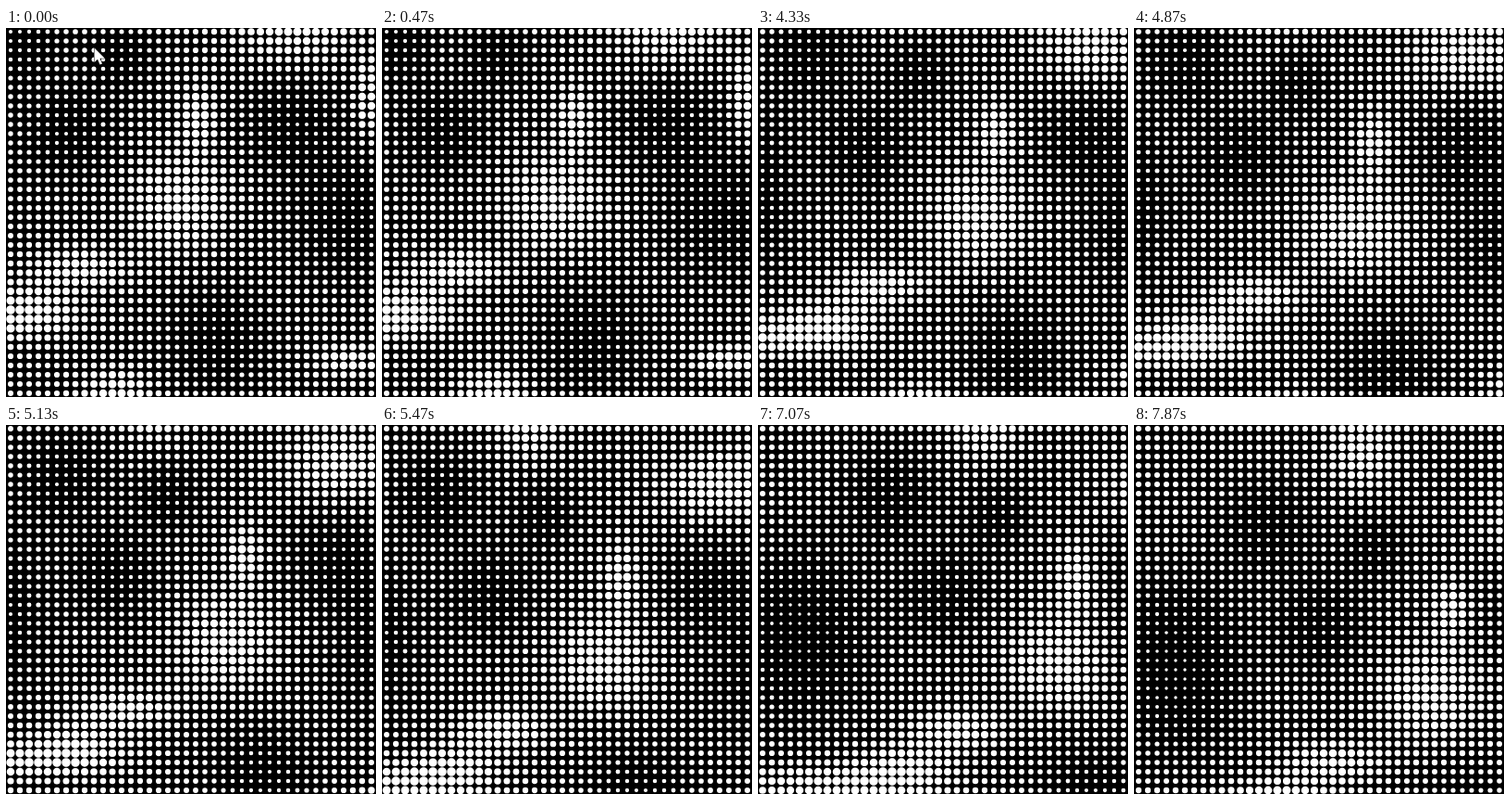
Animation, 400 px wide and 398 px high, one loop 8 s. Source, as an HTML page with a canvas:

```html
<!DOCTYPE html>
<html>
<head>
<meta charset="utf-8">
<style>
html, body { margin: 0; width: 100%; height: 100%; overflow: hidden; background: #000; }
canvas { display: block; }
</style>
</head>
<body>
<canvas id="stage" width="400" height="398"></canvas>
<script>
const ctx = document.getElementById('stage').getContext('2d');
const LOOP = 8000, GRID = 10, TICK = 67;
const pointer = new Path2D('M.5 .5V16L4 12.7 6.5 18.5 9 17.4 6.5 11.8H11.8Z');

// Where dots swell: x, y, spread across, spread down
const hills = [
  [312, -3, 42, 28], [390, 75, 9, 30],
  [208, 95, 14, 24], [188, 188, 38, 36],
  [80, 260, 36, 15], [25, 302, 36, 18], [-60, 318, 70, 14],
  [110, -74, 25, 30], [372, 358, 26, 12], [120, 390, 26, 16]
];
// Where dots shrink: x, y, spread
const hollows = [
  [68, 112, 34], [308, 102, 36], [375, 200, 46], [228, 335, 38],
  [10, 8, 34], [125, 30, 24], [-90, 125, 48], [-85, 190, 42]
];

const clamp = (v, lo, hi) => Math.min(hi, Math.max(lo, v));
const ticks = (t, start, count) => clamp(Math.floor((t - start) / TICK) + 1, 0, count);
const passed = (t, ...times) => times.filter(at => t >= at).length;

function bump(x, y, [cx, cy, sx, sy = sx]) {
  return Math.exp(-(((x - cx) / sx) ** 2 + ((y - cy) / sy) ** 2) / 2);
}

function radius(x, y) {
  const sum = list => list.reduce((total, b) => total + bump(x, y, b), 0);
  return clamp(3.05 + 1.55 * sum(hills) - sum(hollows), 1.7, 4.8);
}

function drawDots(dx, dy) {
  ctx.beginPath();
  for (let y = 4; y < 400; y += GRID) {
    for (let x = 5; x < 400; x += GRID) {
      const r = radius(x - dx, y - dy);
      ctx.moveTo(x + r, y);
      ctx.arc(x, y, r, 0, Math.PI * 2);
    }
  }
  ctx.fill();
}

function drawPointer(t) {
  const gone = ticks(t, 270, 4) ** 2;
  ctx.save();
  ctx.translate(95 + 1.2 * gone, 21 - 3.2 * gone);
  ctx.stroke(pointer);
  ctx.fill(pointer);
  ctx.restore();
}

function frame(now) {
  const t = now % LOOP;
  const dx = 50 * passed(t, 3870) + 42.5 * passed(t, 6270, 7070);
  const nudges = passed(t, 3930, 4130, 4330, 5470) + ticks(t, 4800, 8);
  const dy = 5.67 * nudges + 17.5 * passed(t, 7130, 7870);

  ctx.fillStyle = '#000';
  ctx.fillRect(0, 0, 400, 398);
  ctx.fillStyle = '#fff';
  drawDots(dx, dy);
  drawPointer(t);
  requestAnimationFrame(frame);
}

frame(0);
</script>
</body>
</html>
```
